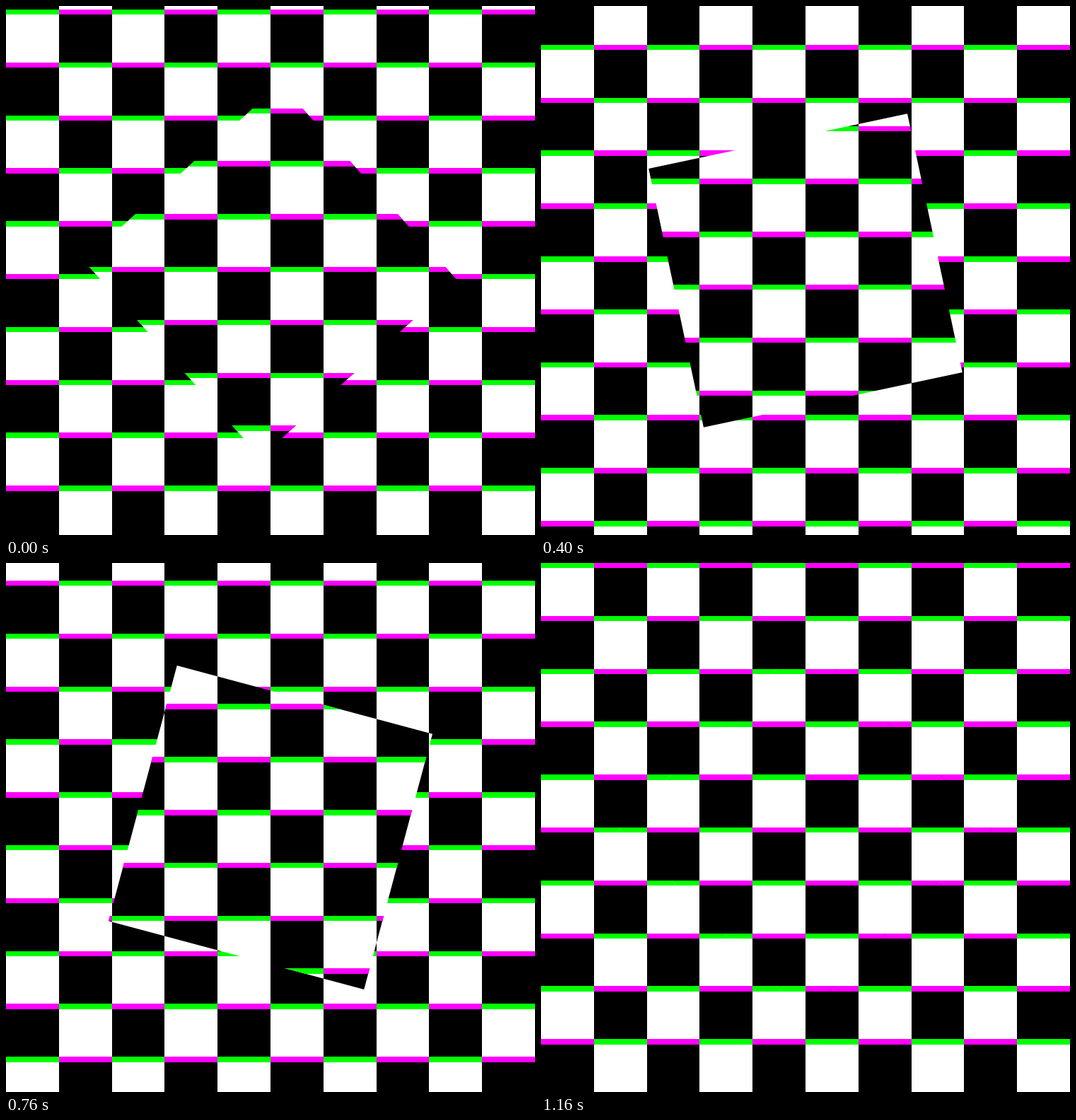
Write an HTML page with a canvas that moves like this. It is 748 by 748 pixels and loops after 1200 ms.

```html
<!DOCTYPE html>
<html lang="en">
<head>
<meta charset="utf-8">
<title>Checker turn</title>
<style>
  html, body { margin: 0; width: 100%; height: 100%; overflow: hidden; background: #000; }
  canvas { display: block; width: 100%; height: 100%; }
</style>
</head>
<body>
<canvas id="stage" width="748" height="748"></canvas>
<script>
const SIZE = 748;
const COUNT = 10;
const CELL = SIZE / COUNT;
const BAR = CELL / 10;
const STEP_MS = 40;
const STEPS = 30;

const ctx = document.getElementById('stage').getContext('2d');

function fillBox(x0, y0, x1, y1, color) {
  const left = Math.round(x0);
  const top = Math.round(y0);
  ctx.fillStyle = color;
  ctx.fillRect(left, top, Math.round(x1) - left, Math.round(y1) - top);
}

// Checkerboard shifted vertically; each cell carries a coloured bar on its top edge.
function drawBoard(shift) {
  for (let row = -3; row < COUNT + 3; row++) {
    const y = row * CELL + shift;
    for (let col = 0; col < COUNT; col++) {
      const x = col * CELL;
      const light = (row + col) % 2 === 0;
      fillBox(x, y, x + CELL, y + CELL, light ? '#fff' : '#000');
      fillBox(x, y, x + CELL, y + BAR, light ? '#0f0' : '#f0f');
    }
  }
}

function clipSquare(angle) {
  const mid = SIZE / 2;
  const half = SIZE / 4;
  ctx.translate(mid, mid);
  ctx.rotate(angle);
  ctx.beginPath();
  ctx.rect(-half, -half, half * 2, half * 2);
  ctx.setTransform(1, 0, 0, 1, 0, 0);
  ctx.clip();
}

// The outer board moves down two cells per loop, the inner one up, under a quarter turn.
function draw(step) {
  const part = (step + 1) / STEPS;
  const shift = part * 2 * CELL;
  drawBoard(shift);
  ctx.save();
  clipSquare((part - 0.5) * Math.PI / 2);
  drawBoard(-shift);
  ctx.restore();
}

const start = performance.now();
let shown = -1;

function tick() {
  const step = Math.floor((performance.now() - start) / STEP_MS) % STEPS;
  if (step !== shown) {
    draw(step);
    shown = step;
  }
  requestAnimationFrame(tick);
}

tick();
</script>
</body>
</html>
```
